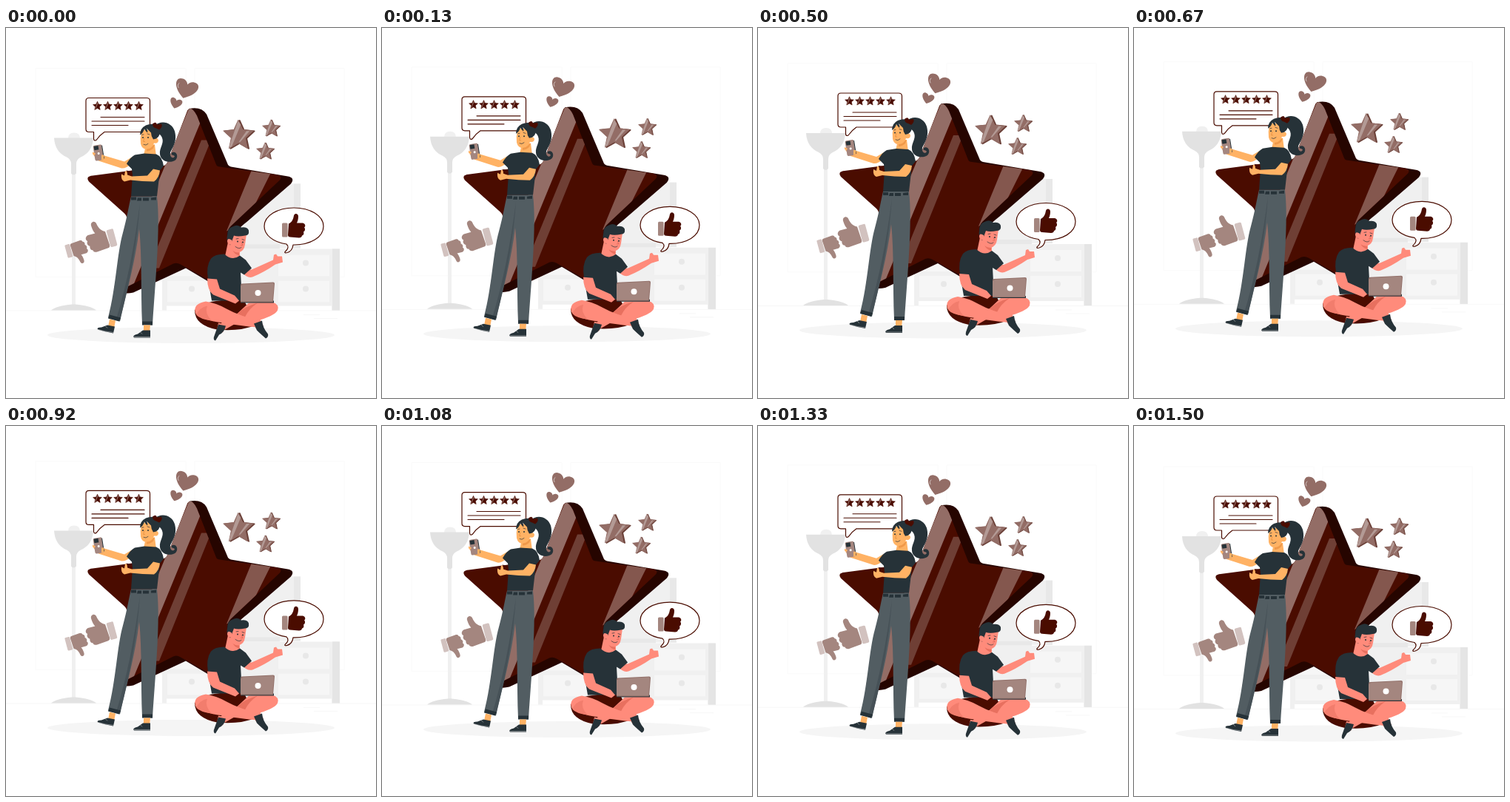
An HTML page that plays this animation: 500x500 px, repeating every 1.54 s.

```html
<!DOCTYPE html>
<html lang="en">
<head>
<meta charset="utf-8">
<title>Five star review</title>
<style>
  html, body { margin: 0; width: 100%; height: 100%; overflow: hidden; background: #fff; }
  svg { display: block; width: 100vw; height: 100vh; }
  .brown { fill: #4a0c00; }
  .side { fill: #260500; }
  .mid { fill: #936d66; }
  .soft { fill: #a4867f; }
  .pale { fill: #d2c2bf; }
  .navy { fill: #263238; }
  .girl { fill: #ffb264; }
  .boy { fill: #ff8b7b; }
  .bubble { fill: #fff; stroke: #4a0c00; stroke-width: 1.2; stroke-linejoin: round; }
  .line { fill: none; stroke: #4a0c00; stroke-width: 1.1; stroke-linecap: round; }
  .ink { fill: none; stroke: #263238; stroke-width: .7; stroke-linecap: round; }
  .g1 { fill: #f5f5f5; }
  .g2 { fill: #f0f0f0; }
  .g3 { fill: #e2e2e2; }
</style>
</head>
<body>
<svg viewBox="0 0 500 500">
  <defs>
    <path id="star" stroke-linejoin="round" d="M0-10 2.8-3.8 9.5-3.1 4.5 1.5 5.9 8.1 0 4.7-5.9 8.1-4.5 1.5-9.5-3.1-2.8-3.8Z"/>
    <path id="hand" d="M-7-3C-3-5-1-8 0-14C1-18 6-17 6-13C6-9 5-6 4-4L12-4C16-3 16 1 14 2C16 4 15 7 13 8C14 10 13 13 11 13C11 15 9 16 7 16L-5 15Q-8 15-8 12Z"/>
    <rect id="cuff" x="-16" y="-4" width="7.6" height="19" rx="1.5"/>
    <path id="heart" d="M0 14C-20 1-17-13-8-12C-4-12-1-9 0-6C1-9 4-12 8-12C17-13 20 1 0 14Z"/>
    <path id="face" d="M247 110Q252 107 258 119L284 185Q285 188 289 188L367 199Q374 201 370 206L304 268Q298 274 299 282L312 363 236 320Q231 317 226 319L154 355Q145 358 147 348L163 260Q164 255 160 251L112 208Q107 201 117 200L208 188Q216 187 218 182L244 115Q245 111 247 110Z"/>
    <clipPath id="front"><use href="#face"/></clipPath>
    <g id="gem">
      <use href="#star" x=".6" y=".2" fill="#6b4038" stroke="#6b4038" stroke-width=".8"/>
      <use href="#star" x="-.3" class="mid" stroke="#936d66" stroke-width=".5"/>
      <path d="M-.5-9.5 1.3-7-4.5 7-6.5 8Z M5-3 7-3 1 4 0 4Z" fill="#b39a95"/>
    </g>
    <g id="rating">
      <use href="#star" class="brown" stroke="#4a0c00" transform="scale(.62)"/>
      <path d="M0-5.2 1-3.8-2.4 4-3.4 4.3Z" class="mid"/>
    </g>
  </defs>

  <g id="scene">
    <!-- room -->
    <path d="M40 55H243V337H40ZM255 55H457V337H255Z" fill="none" stroke="#fafafa"/>
    <path d="M0 382.5H500M416 393H448M402 388H424" stroke="#f5f5f5" stroke-width=".8"/>
    <ellipse cx="250" cy="415.500" rx="194" ry="11" class="g1"/>
    <path class="g2" d="M84 150Q84 142 92 142T100 150ZM89 195H94V377H89Z"/>
    <path class="g3" d="M65 149H118Q117 168 101 175Q95 178 95 184V197Q91 201 88 197V184Q88 178 82 175Q66 168 65 149ZM61 382Q68 376 89 374H94Q115 376 122 382Z"/>
    <path class="g2" d="M320 211H398V298H320Z"/>
    <path fill="#e8e8e8" d="M389 211H398V298H389ZM313 293H370V299H313Z"/>
    <path class="g2" d="M211 299H451V382H440V376H217V382H211Z"/>
    <path fill="#e5e5e5" d="M441 299H451V382H441Z"/>
    <path fill="#f6f6f6" d="M218 307H289V336H218ZM218 342H289V371H218ZM368 307H437V336H368ZM368 342H437V371H368Z"/>
    <g fill="#e8e8e8">
      <circle cx="405" cy="318" r="4"/><circle cx="405" cy="353" r="4"/><circle cx="251" cy="353" r="4"/>
    </g>

    <!-- big star -->
    <path class="side" d="M247 109.500Q264 106 271 117L299 183Q300 187 304 188L381 201Q391 203 385 211L326 262Q305 278 305 290L312 366 243 325 172 358Q160 361 152 356L228 314 290 260 366 203 284 188Z"/>
    <use href="#face" class="brown"/>
    <g clip-path="url(#front)">
      <path class="mid" d="M249 105 271 108 168 358H143Z"/>
      <path fill="#6f3f35" d="M264 152 277 152 207 325H193Z"/>
      <path fill="#84574e" d="M333 190H361L325 262 298 275Z"/>
    </g>

    <!-- floating icons -->
    <g class="mid">
      <use href="#heart" transform="translate(243.500 82.500) rotate(18) scale(1.03 .95)"/>
      <use href="#heart" transform="translate(229.500 102) rotate(18) scale(.55 .52)"/>
    </g>
    <path d="M233 81Q231 77 234 75" fill="none" stroke="#d2c2bf" stroke-linecap="round"/>
    <use href="#gem" transform="translate(314.500 146) scale(2.1)"/>
    <use href="#gem" transform="translate(358.500 136.500) scale(1.22)"/>
    <use href="#gem" transform="translate(350.500 167.500) scale(1.22)"/>
    <g transform="translate(126.500 281.500) rotate(-15) scale(-1.25 1.25)">
      <use href="#hand" class="soft"/><use href="#cuff" class="pale"/>
    </g>
    <g transform="translate(97 304) rotate(-15) scale(.92 -.95)">
      <use href="#hand" class="soft"/><use href="#cuff" class="pale"/>
    </g>

    <!-- review bubble -->
    <path class="bubble" d="M112 95H190Q194.500 95 194.500 99V137Q194.500 141 190 141H133Q127 145 122 152Q118 154 118.500 148V141H112Q108 141 108 137V99Q108 95 112 95Z"/>
    <g id="ratings"></g>
    <path class="line" d="M128 121H187M116 126.500H187M116 132H165"/>

    <!-- like bubble -->
    <path class="bubble" d="M388 293.500C412 294 429 283 429 268.500C429 254 411 243.500 389 243.500S349 254 349 268.500C349 280 361 290 379 292.500Q384 297 377 303Q376 305 380 304Q387 302 388 293.500Z"/>
    <g transform="translate(389 268)">
      <use href="#hand" class="brown"/><use href="#cuff" class="soft"/>
    </g>

    <!-- standing woman -->
    <path class="navy" d="M200 133C210 124 224 128 228 140C232 155 224 163 222 169C221 175 226 178 228 174C226 171 222 173 224 169C230 166 234 174 229 179C222 184 209 181 208 171C207 162 214 157 211 149C209 143 204 142 200 142Z"/>
    <path class="girl" d="M189 158H201L203 174Q195 180 186 173Z"/>
    <path d="M190 164 201 158 199 163Q195 167 190 167Z" fill="#f0994a"/>
    <path class="girl" d="M183 141Q181 149 182 157Q184 165 191 164Q198 163 200 156Q206 157 206 152Q205 148 200 150L198 138H185Z"/>
    <path class="navy" d="M181 145Q181 136 189 132Q201 127 207 136Q210 146 203 150L199 151Q196 147 196 142L190 136Q192 140 191 142Q188 139 187 137Q185 143 181 145Z"/>
    <path class="brown" d="M198 130Q203 126 204 131L210 130Q212 134 207 138L203 136Q198 135 198 130Z"/>
    <path class="ink" d="M183.500 145 186 144.500M191 143.500 194 144.500M186 158Q189 160 192 157"/>
    <path d="M187 149 185.500 154 188 154" fill="none" stroke="#e08a3a" stroke-width=".7"/>
    <g class="navy"><circle cx="185" cy="148.500" r="1"/><circle cx="192" cy="148.500" r="1"/></g>
    <path class="girl" d="M170 175 160 181 133 173 121 168 118 172 125 180 156 190Q162 191 169 184Z"/>
    <g transform="translate(125 169) rotate(-9)">
      <rect x="-6" y="-10.500" width="12" height="21" rx="2" class="soft"/>
      <path class="navy" d="M-5-9.500H1V-4H-5ZM5.500-9V9H6.500V-9Z"/>
      <circle cy="1" r="1.500" fill="#fff"/>
    </g>
    <path class="girl" d="M117 168 121 170 120 172 117 171ZM129 172 132 172 132 178 129 179Z"/>
    <path class="navy" d="M187 170 174 172Q168 175 163 184L170 191 171 200 169 228H204L208 193 213 187Q211 174 203 171Z"/>
    <path class="girl" d="M199 191 208 193Q207 203 200 208Q185 208 168 206L160 208Q155 206 156 198L160 200 161 194Q164 193 164 199L170 201 191 200Z"/>
    <path class="brown" d="M162 193Q165 194 165 199L169 200V194Z"/>
    <path fill="#525d62" d="M169 228H204C209 270 202 340 198 402L184 401C182 355 184 310 180 272C175 315 163 357 154 397L138 392C149 350 150 305 158 277C164 255 166 240 169 228Z"/>
    <path d="M181 237Q176 310 154 395L149 394Q170 325 181 237Z" fill="#465157"/>
    <path class="navy" d="M169 229H176V233H169ZM178 230H183V234H177ZM185 230H193V234H185ZM196 230 203 229V233H196ZM140 388 155 392 153 397 138 393ZM184 397H198V402H184Z"/>
    <path class="girl" d="M140 394 148 396 146 406 138 404ZM186 402H195L194 412H186Z"/>
    <path class="navy" d="M137 402 147 404 145 413Q133 411 124 408Q122 405 129 405ZM185 409 195 409 195 419H173Q170 416 178 414Z"/>
    <path d="M124 408Q134 411 145 412M173 418H195M134 403 137 406M181 411 184 414" fill="none" stroke="#d8d8d8" stroke-width=".5"/>

    <!-- sitting man -->
    <path class="brown" d="M260 376Q285 365 322 369L338 402Q315 411 285 408Q255 402 255 382Z"/>
    <path class="boy" d="M300 290 316 300 316 309Q306 316 296 309Z"/>
    <path d="M306 300 315 304 315 308Q308 306 306 300Z" fill="#e8705f"/>
    <path class="boy" d="M302 278Q299 285 301 293Q305 304 314 304Q322 302 323 293L325 279Z"/>
    <path class="navy" d="M303 294Q297 288 299 281Q299 271 306 269Q313 265 318 270Q326 269 328 274Q329 281 323 281Q313 283 308 281L305 289Z"/>
    <path class="boy" d="M305 287Q299 283 299 289Q300 294 305 293Z"/>
    <path class="ink" d="M311 285.500 314 285M319 286 322 287M310 296Q315 300 318 297"/>
    <path d="M318 290 320 294 317 294" fill="none" stroke="#d85f52" stroke-width=".7"/>
    <g class="navy"><circle cx="313" cy="289" r="1"/><circle cx="320" cy="290" r="1"/></g>
    <path class="boy" d="M322 326 332 327 361 314 362 307 365 306 367 309 373 309 374 317 364 320Q348 331 333 337Q326 339 319 331Z"/>
    <path class="navy" d="M295 306Q306 316 316 308L324 314 332 325 322 334 317 331 319 369H278L273 340Q270 322 277 312Q282 306 295 306Z"/>
    <path class="boy" d="M272 339 285 340 289 353 309 362 315 369 310 373 280 361Q272 355 272 339Z"/>
    <path class="boy" d="M328 372 360 371Q370 374 367 382Q363 390 336 397L310 400 296 408 287 406 292 398 313 386Z"/>
    <path d="M312 387Q322 377 340 372Q328 380 323 391Z" fill="#e8705f"/>
    <path class="boy" d="M270 370Q284 372 298 380Q316 390 343 396L339 405Q318 403 294 399Q262 395 256 386Q252 373 270 370Z"/>
    <path d="M257 388Q262 378 272 376Q268 386 278 396Q262 394 257 388Z" fill="#f27d6d"/>
    <path class="boy" d="M287 399 297 401 293 412 285 408ZM332 395 343 393 348 404 338 407Z"/>
    <path class="navy" d="M287 401 297 403Q295 412 288 415L283 423Q279 422 282 415ZM335 400 346 396Q347 406 354 414Q355 418 351 420Q343 413 339 409Z"/>
    <path class="navy" d="M317 369H362V372H317Z"/>
    <path d="M319 346 361 344Q363 344 363 346L361 371H317V348Q317 346 319 346Z" fill="#927069"/>
    <path class="soft" d="M320 347 360 345Q362 345 362 347L360 370H317V349Z"/>
    <circle cx="340.500" cy="358.500" r="4" fill="#fff"/>
  </g>
</svg>
<script>
  const LOOP = 1540, STEP = LOOP / 37, LOWEST = 1500, RISE = 10;
  const scene = document.getElementById('scene');

  document.getElementById('ratings').innerHTML = [0, 1, 2, 3, 4]
    .map(i => `<use href="#rating" x="${123.5 + i * 14}" y="106"/>`).join('');

  // Linear bob: up for half the loop, down for the other half
  function draw() {
    const time = Math.floor((performance.now() % LOOP + 4) / STEP) * STEP;
    const phase = ((time - LOWEST + LOOP) % LOOP) / LOOP;
    const lift = RISE * (1 - Math.abs(1 - 2 * phase));
    scene.setAttribute('transform', `translate(0 ${-lift})`);
    requestAnimationFrame(draw);
  }
  draw();
</script>
</body>
</html>
```
